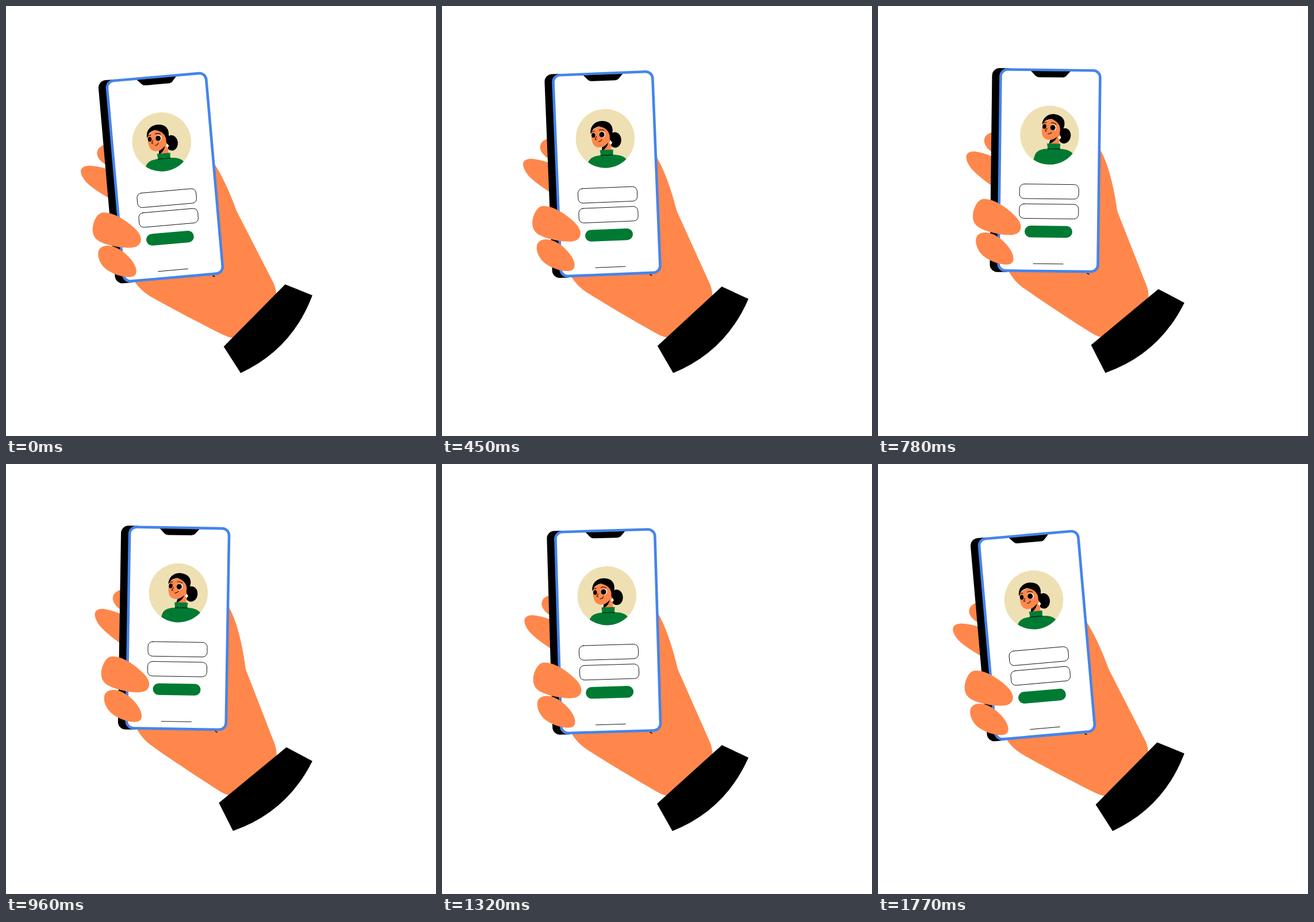
These frames come from a looping animation (748 px wide and 748 px high, 1.8 s). An HTML page:

```html
<!DOCTYPE html>
<html lang="en">
<head>
<meta charset="utf-8">
<title>Hand holding a phone</title>
<style>
  html, body { margin: 0; width: 100%; height: 100%; overflow: hidden; background: #fff; }
  svg { display: block; width: 100vw; height: 100vh; }
  .skin { fill: #ff874c; }
  .green { fill: #007a33; }
  .line { fill: none; stroke: #000; stroke-linecap: round; }
</style>
</head>
<body>
<svg viewBox="0 0 748 748">
  <clipPath id="disc"><circle r="51.3"/></clipPath>
  <g id="arm">
    <!-- palm, thumb, far fingers and cuff -->
    <g class="skin">
      <path d="M300 357H414.600L467 486Q471 496 470.500 508L393 577Q385 577 370 568C320 537 280 511 251 491Q236 480 227 464L300 400Z"/>
      <path id="thumb" d="M360 200L384.500 251C400 277 410 325 414.600 357L414 400H310V200Z"/>
      <path d="M204 222C186 221 180.500 231 181.500 239Q184 252 204 262Z"/>
      <path d="M150.500 265C151 257 160 254 172 257Q188 260 204 268V321Q172 300 159 285Q150.200 273 150.500 265Z"/>
    </g>
    <path d="M371.600 590.100L487.500 491.400L533 514.600Q490 604.500 397 638.300Z"/>

    <!-- phone -->
    <rect x="193.800" y="110.400" width="40" height="354.600" rx="13"/>
    <path d="M363.500 465.500l3 1.500" class="line" stroke-width="1.500"/>
    <rect x="208.800" y="112.600" width="173" height="349.900" rx="12" fill="#fff" stroke="#4584ec" stroke-width="4.600"/>
    <path d="M261.500 114.600L269.500 123Q272 125.400 276 125.400H316Q320.500 125.400 323 122.500L330 114.600Z"/>
    <g class="line" stroke-width=".9">
      <rect x="244" y="311.400" width="103" height="25.300" rx="8"/>
      <rect x="244" y="345.900" width="103" height="25.300" rx="8"/>
      <path d="M269.300 449.800h52"/>
    </g>
    <rect class="green" x="253.600" y="383.700" width="83" height="20.400" rx="10.200"/>

    <!-- portrait -->
    <g transform="translate(295.200 225.800)">
      <circle r="51.300" fill="#eee0b3"/>
      <g clip-path="url(#disc)">
        <g id="bust">
          <g id="head">
            <ellipse cx="17" cy="3.300" rx="10.800" ry="13.400"/>
            <path class="skin" d="M-24 -14C-24.500 0 -23 7 -20 11C-16 16 -9 16 -4 14L-6 24H10V-10L-4 -24Z"/>
            <path d="M5 7Q0 13 -6 15L-7 22Q3 17 5 7Z"/>
            <path d="M-25 -9C-26 -22 -17 -30.500 -5 -30.500C6 -30.500 13 -25 13.500 -15L12 4C8 6 7.500 1 8 -4C7 -14 0 -19 -10 -21.500C-15 -20 -21 -18 -22.500 -13Q-23.500 -10 -25 -9Z"/>
            <path class="line" stroke-width="1" d="M-23 -12.500l5 -1M-10 -14.500q5 -2 9 1M-15 -4l-2.500 5 2.500 .5M-12 5q4 .5 6 -3.500"/>
            <g id="eyes">
              <ellipse cx="-4.900" cy="-7" rx="5.500" ry="5.300" fill="#fff"/>
              <ellipse cx="-20.300" cy="-6.200" rx="3.200" ry="4.100"/>
              <ellipse cx="-5.600" cy="-6.800" rx="4.600" ry="4.700"/>
            </g>
            <path d="M9.300 4l2.800 4-2.800 3-2.800-3Z" fill="#fff"/>
          </g>
          <path class="green" d="M-10 20H13L12.500 29C23 29.500 31 31.500 36 38.500L45 70H-40L-31 40C-28 32.500 -20 29.500 -9 29Z"/>
          <path class="line" stroke-width=".9" d="M-9 29.300H12.500"/>
        </g>
      </g>
    </g>

    <!-- near fingers -->
    <g class="skin" transform="translate(-.4 .6)">
      <path id="ring" d="M163.800 367C164 355 171 340 180 338C197 335 222 351 238 367C250 379 250 391 242 396C232 404 195 397 180 390C168 385 163.500 377 163.800 367Z"/>
      <path id="little" d="M169.500 409C170 401 176 396 185 396C202 395 222 412 231 427C237 438 237 447 230 450C218 454 195 447 182 436C173 428 169 417 169.500 409Z"/>
    </g>
  </g>
</svg>
<script>
const LOOP = 1800, STEP = 30;
const [arm, thumb, ring, little, bust, head, eyes] =
  ["arm", "thumb", "ring", "little", "bust", "head", "eyes"].map(id => document.getElementById(id));
const move = (el, value) => el.setAttribute("transform", value);
const turn = (el, angle, x, y) => move(el, `rotate(${angle} ${x} ${y})`);
const ease = (t, from, to) => {
  const s = Math.min(1, Math.max(0, (t - from) / (to - from)));
  return s * s * (3 - 2 * s);
};

// Swing out in the first half, slightly late in the middle, and back in the second.
function swing(t) {
  if (t >= 900) return 1 - ease(t, 900, LOOP);
  const s = t / 900;
  return ease(s - 0.033 * Math.sin(Math.PI * s) ** 2, 0, 1);
}

function draw(t) {
  const out = swing(t), bend = 1 - out;
  turn(arm, 6 * out - 5, 404, 510);
  turn(thumb, -6.5 * bend, 414.6, 357);
  turn(ring, 4 * bend, 165, 350);
  turn(little, 4 * bend, 172, 395);

  const lift = ease(t, 480, 720) - ease(t, 870, 1090);
  move(bust, `translate(${5.8 * lift} ${-5.3 * lift})`);
  turn(head, 10 * lift, 1.5, 22);
  const blink = Math.max(0, 1 - Math.abs(t - 1140) / 75);
  move(eyes, `translate(0 -4) scale(1 ${1 - 0.85 * blink}) translate(0 4)`);
}

const start = performance.now();
function tick() {
  const t = (performance.now() - start) % LOOP;
  draw(Math.floor(t / STEP) * STEP);
  requestAnimationFrame(tick);
}
tick();
</script>
</body>
</html>
```
